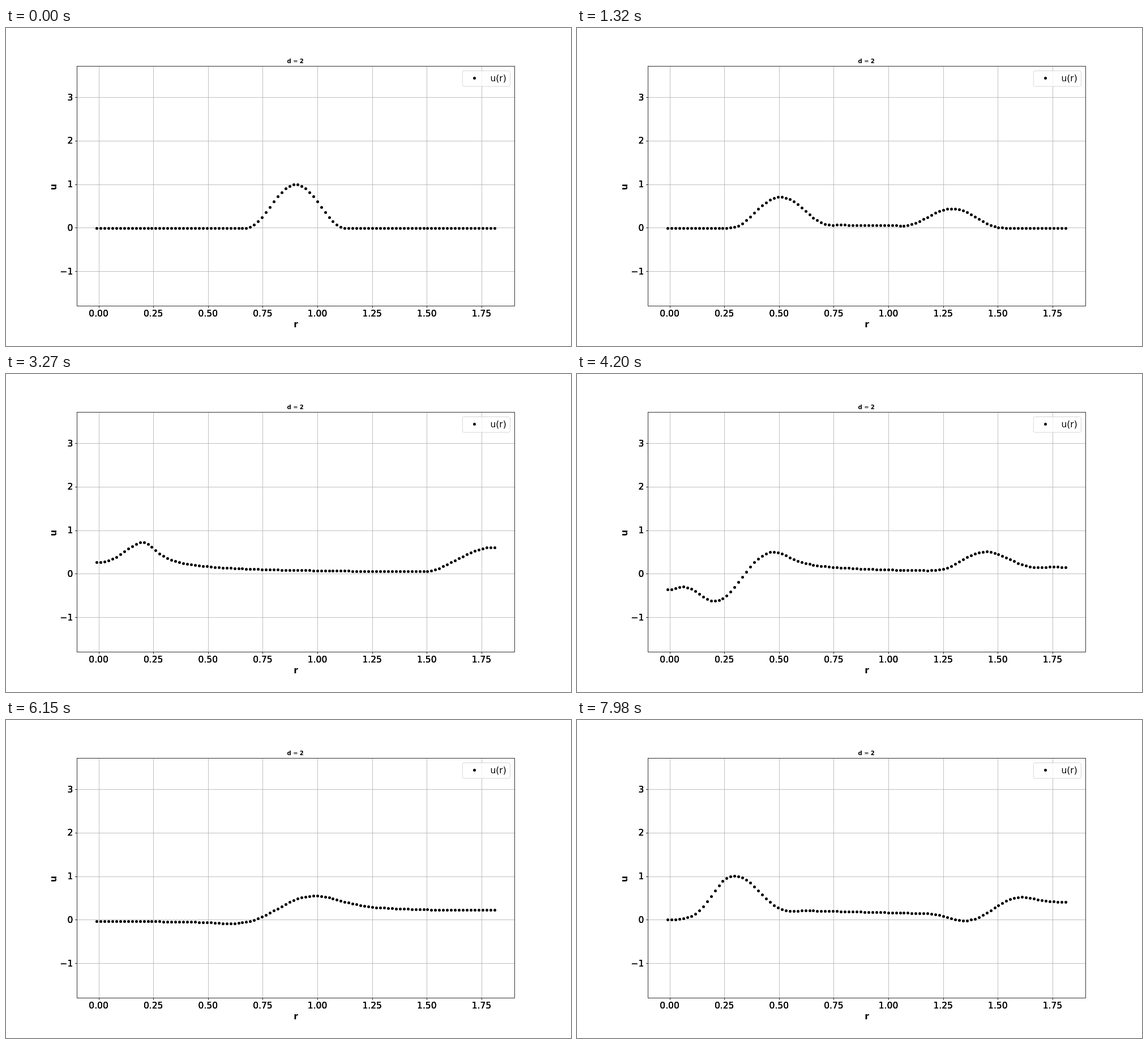
Write an HTML page with a canvas that moves like this. It is 998 px wide and 561 px high and loops after 8 s.

```html
<!DOCTYPE html>
<html lang="en">
<head>
<meta charset="utf-8">
<title>Radial wave</title>
<style>
  html, body { margin: 0; width: 100%; height: 100%; overflow: hidden; background: #fff; }
  canvas { display: block; }
</style>
</head>
<body>
<canvas id="stage" width="998" height="561"></canvas>
<script>
const ctx = document.getElementById('stage').getContext('2d');
const LOOP = 8000, STEP = 30;
const FONT = '"DejaVu Sans", sans-serif';
const SIZE = 15.5;
const AXES = { left: 125.5, right: 898.5, top: 67.5, bottom: 490.5 };

const toX = r => 163.55 + r * 386.5;
const toY = u => 352.8 - u * 76.7;
const snap = v => Math.floor(v + 0.5) + 0.5;
const snapDown = v => Math.floor(v) + 0.5;

// Radial wave equation in two dimensions, staggered grid, one time step per frame.
const CELLS = 100, R_MAX = 1.8, H = R_MAX / CELLS;
const COURANT = 0.5, DT = COURANT * H;
const CENTER = 0.9, HALF_WIDTH = 0.229;
const KICK = 0.5; // initial velocity relative to the initial height
const radius = i => (i - 0.5) * H;

function bump(r) {
  const s = Math.abs(r - CENTER) / HALF_WIDTH;
  return s < 1 ? Math.cos(Math.PI * s / 2) ** 2 : 0;
}

function mirrorEnds(u) {
  u[0] = u[1];
  u[CELLS + 1] = u[CELLS];
  return u;
}

function laplacian(u, i) {
  const inner = (i - 1) * (u[i] - u[i - 1]);
  const outer = i * (u[i + 1] - u[i]);
  return (outer - inner) / (i - 0.5);
}

function simulate(count) {
  const k = COURANT * COURANT;
  const first = Array.from({ length: CELLS + 2 }, (_, i) => bump(radius(i)));
  const states = [mirrorEnds(first)];
  for (let n = 1; n < count; n++) {
    const now = states[n - 1], before = states[n - 2];
    const next = new Array(CELLS + 2).fill(0);
    for (let i = 1; i <= CELLS; i++) {
      const push = k * laplacian(now, i);
      next[i] = before
        ? 2 * now[i] - before[i] + push
        : now[i] * (1 + KICK * DT) + push / 2;
    }
    states.push(mirrorEnds(next));
  }
  return states;
}

const states = simulate(Math.ceil(LOOP / STEP));

function line(x1, y1, x2, y2, color) {
  ctx.strokeStyle = color;
  ctx.lineWidth = 0.8;
  ctx.beginPath();
  ctx.moveTo(x1, y1);
  ctx.lineTo(x2, y2);
  ctx.stroke();
}

function text(str, x, y, align = 'center', size = SIZE, weight = 'normal') {
  ctx.font = `${weight} ${size}px ${FONT}`;
  ctx.textAlign = align;
  ctx.fillStyle = '#000';
  ctx.fillText(str, x, y);
}

// Tick labels are overprinted, which gives them their heavier edges.
function tickLabel(str, x, y, align) {
  for (let n = 0; n < 3; n++) text(str, x, y, align);
}

function dot(x, y) {
  ctx.fillStyle = '#000';
  ctx.beginPath();
  ctx.arc(x, y, 2.5, 0, 2 * Math.PI);
  ctx.fill();
}

function drawGrid() {
  const { left, right, top, bottom } = AXES;
  for (let n = 0; n < 8; n++) {
    const r = n * 0.25, x = snap(toX(r));
    line(x, top, x, bottom, '#b0b0b0');
    line(x, bottom, x, bottom + 3.5, '#000');
    tickLabel(r.toFixed(2), toX(r), 509);
  }
  for (let u = -1; u <= 3; u++) {
    const y = snapDown(toY(u));
    line(left, y, right, y, '#b0b0b0');
    line(left - 3.5, y, left, y, '#000');
    tickLabel(String(u).replace('-', '\u2212'), 118.3, Math.round(toY(u) + 5), 'right');
  }
}

function drawFrame() {
  const { left, right, top, bottom } = AXES;
  ctx.strokeStyle = '#000';
  ctx.lineWidth = 0.8;
  ctx.strokeRect(left, top, right - left, bottom - top);
}

function drawLabels() {
  text('d', 496.6, 62, 'left', 10, 'bold');
  text('=', 511.5, 62, 'center', 10);
  text('2', 522.3, 62, 'center', 10, 'bold');
  text('r', 512, 528, 'center', SIZE, 'bold');
  ctx.save();
  ctx.translate(89, 280.5);
  ctx.rotate(-Math.PI / 2);
  text('u', 0, 0, 'center', SIZE, 'bold');
  ctx.restore();
}

function drawLegend() {
  ctx.beginPath();
  ctx.roundRect(806.3, 75.5, 84.2, 27.5, 3);
  ctx.fillStyle = 'rgba(255,255,255,0.8)';
  ctx.fill();
  ctx.strokeStyle = 'rgba(204,204,204,0.8)';
  ctx.lineWidth = 1;
  ctx.stroke();
  dot(827.5, 88.5);
  text('u(r)', 855.4, 94, 'left');
}

function draw(time) {
  const state = states[Math.floor((time % LOOP) / STEP)];
  ctx.fillStyle = '#fff';
  ctx.fillRect(0, 0, 998, 561);
  drawGrid();
  state.forEach((u, i) => dot(snap(toX(radius(i))), snap(toY(u))));
  drawFrame();
  drawLabels();
  drawLegend();
}

const start = performance.now();
function tick() {
  draw(performance.now() - start);
  requestAnimationFrame(tick);
}
tick();
</script>
</body>
</html>
```
